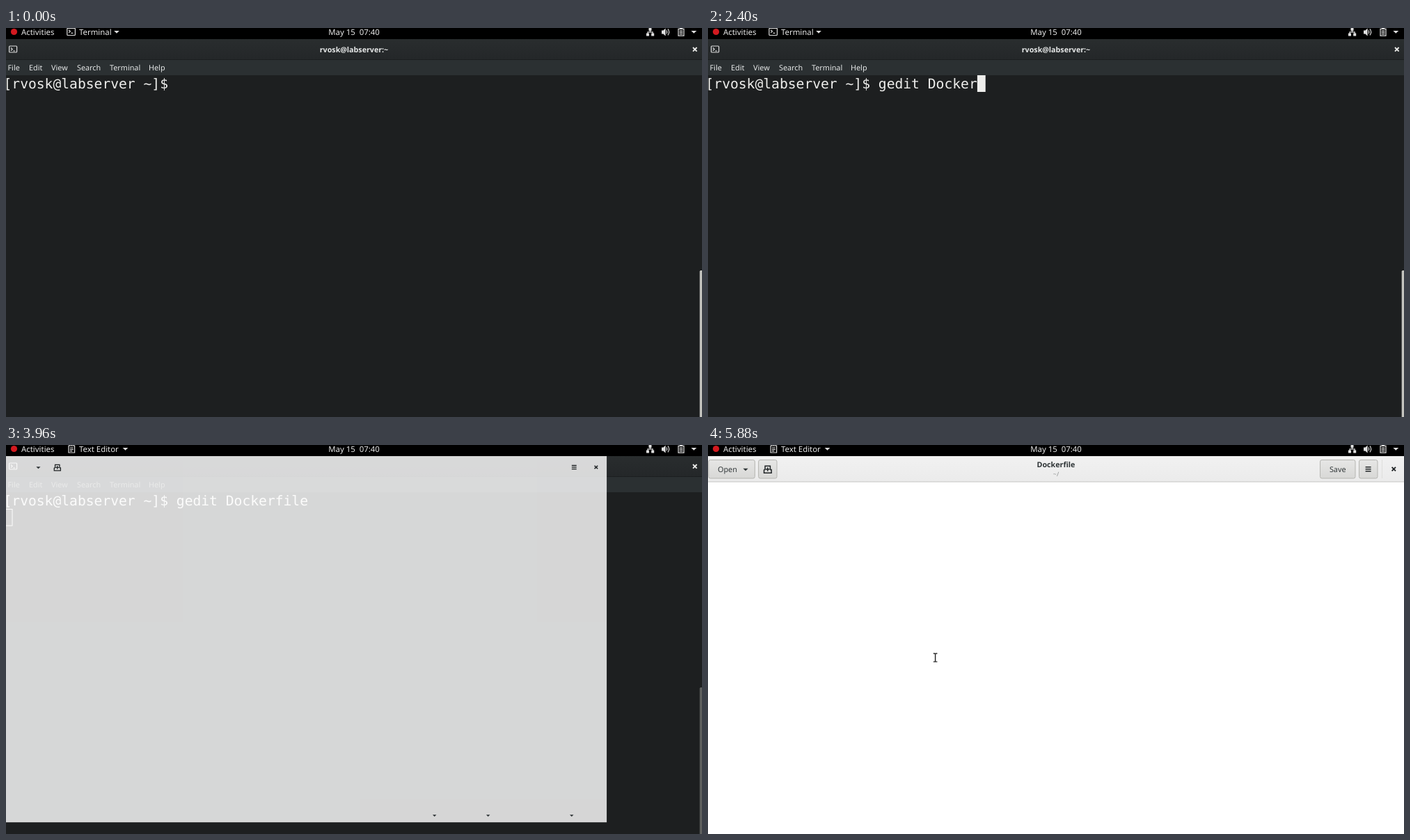
An HTML page for the animation above (6 s loop, 1000x560 px).

```html
<!DOCTYPE html>
<html lang="en">
<head>
<meta charset="utf-8">
<title>Terminal</title>
<style>
  html, body { margin: 0; width: 100%; height: 100%; overflow: hidden; background: #000; }
  svg { display: block; width: 1000px; height: 560px; }
  text { font-family: "Noto Sans", "Open Sans", sans-serif; white-space: pre; text-rendering: geometricPrecision; }
  .bar { font-size: 11.4px; font-weight: 500; fill: #e8e8e8; }
  .menu { font-size: 10.8px; fill: #e6e8e8; }
  .bold { font-size: 10.7px; font-weight: 700; }
  .mono { font-family: "DejaVu Sans Mono", monospace; font-size: 19.65px; fill: #eeeeec; }
  .btn { font-size: 10.8px; fill: #33393b; }
  .line { fill: none; stroke-width: 1.2; }
</style>
</head>
<body>
<svg id="stage" viewBox="0 0 1000 560" xmlns="http://www.w3.org/2000/svg"></svg>
<script>
const LOOP = 6000;
const CELL = 11.83, LEFT = -3.5, ROW = 68, ROW_H = 24;
const PROMPT = "[rvosk@labserver ~]$ ";
const COMMAND = "gedit Dockerfile";
const KEYS = [600, 960, 1080, 1260, 1380, 1560, 1860, 1980, 2100, 2160, 2280, 2400, 2580, 2700, 2820, 2940];
const CURSOR_ON = 60, ENTER = 3360, LAUNCH = 3660, BLUR = 3720, POINTER = 5400;
// start time, x scale, y scale, opacity
const OPENING = [
  [3900, .053, .084, .03],
  [3960, .8605, .86, .82],
  [4020, .9985, .9985, .987],
  [4080, 1, 1, 1]
];

const label = (x, y, s, cls, extra = "") => `<text x="${x}" y="${y}" class="${cls}" ${extra}>${s}</text>`;
const mid = 'text-anchor="middle"';
const arrow = (x, y, w, color) => `<path d="M${x - w} ${y - w / 2}h${2 * w}l${-w} ${w}z" fill="${color}"/>`;
const cross = (x, y, r, color) =>
  `<path d="M${x - r} ${y - r}l${2 * r} ${2 * r}M${x + r} ${y - r}l${-2 * r} ${2 * r}" stroke="${color}" stroke-width="1.8"/>`;
const button = (x, w) =>
  `<rect x="${x}" y="21.5" width="${w}" height="26.5" rx="2.5" fill="url(#face)" stroke="#b5b5b1"/>`;
const prompt = (x, y, w, h) =>
  `<g class="line" stroke="#dedede"><rect x="${x}" y="${y}" width="${w}" height="${h}" rx="1"/>
   <path d="M${x + 2.4} ${y + 2.5}l2.2 2-2.2 2M${x + 5.6} ${y + 7}h3"/></g>`;

const menus = [["File", 2.5], ["Edit", 33], ["View", 65], ["Search", 102], ["Terminal", 149], ["Help", 205]];

const terminal = `
  <rect y="16" width="1000" height="544" fill="#1d1f20"/>
  <rect y="16" width="1000" height="30" fill="url(#title)"/>
  <rect y="45" width="1000" height="1" fill="#1b1e1f"/>
  <rect y="46" width="1000" height="22" fill="#2b3032"/>
  ${prompt(4.6, 26, 11, 9)}
  ${cross(989.8, 30.8, 2.8, "#eeeeec")}
  ${label(500, 34.5, PROMPT.slice(1, 16) + ":~", "bold", mid + ' fill="#e6e8e8" id="caption"')}
  <g id="menus">${menus.map(([s, x]) => label(x, 60.7, s, "menu")).join("")}</g>
  <rect id="thumb" x="996.7" y="349" width="5" height="215" rx="1.5"/>
  <text id="typed" class="mono" x="${LEFT}" y="87"></text>
  <rect id="cursor" stroke="#eeeeec"/>`;

const panel = `
  <rect width="1000" height="16" fill="#000"/>
  <circle cx="11.5" cy="5.5" r="4.6" fill="#d3191f"/>
  ${label(22, 9.6, "Activities", "bar")}
  <g id="appTerm">${prompt(87.8, .3, 11.6, 10.2)}
    ${label(105, 9.6, "Terminal", "bar")}${arrow(159, 5.9, 3.8, "#dedede")}</g>
  <g id="appEdit"><g class="line" stroke="#dedede">
      <path d="M90 1h8.6v10h-8.6zM91.8 4h5M91.8 6.3h5M91.8 8.6h3.4M91.6 -.5v2M94.3 -.5v2M97 -.5v2"/></g>
    ${label(105, 9.6, "Text Editor", "bar")}${arrow(171.5, 5.9, 3.8, "#dedede")}</g>
  ${label(500, 9.6, "May 15\u00a0 07:40", "bar", mid)}
  <g fill="#e0e0e0">
    <path d="M923.5 0h4v4h-4zM920 7.5h4v4h-4zM927.2 7.5h4v4h-4z"/>
    <path d="M942 3.5h2.4l3.2-3v11l-3.2-3h-2.4z"/>
  </g>
  <g class="line" stroke="#e0e0e0">
    <path d="M925.5 4v2M922 8v-2.2h7.2v2.2"/>
    <path d="M949 3.4q1.6 2.4 0 4.8M951 1.4q3.4 4.5 0 9"/>
    <path d="M966 1.4h8v9.8h-8zM968 .2h4M967.6 4.2h4.8M967.6 6.4h4.8M967.6 8.6h4.8"/>
  </g>
  ${arrow(988.3, 5.9, 3.9, "#e0e0e0")}`;

const editor = `
  <rect y="16" width="1003" height="613" fill="#fff"/>
  <g id="header">
    <rect y="16" width="1003" height="37" fill="url(#head)"/>
    <rect y="52.5" width="1003" height="1" fill="#c6c6c3"/>
    ${button(.8, 66.5)}${button(72.6, 26.4)}${button(879.5, 50.5)}${button(935.5, 26.5)}
    <rect x="968" y="21" width="1" height="27" fill="#dededc"/>
    ${label(14, 38.6, "Open", "btn")}
    ${label(904.7, 38.6, "Save", "btn", mid)}
    ${label(500, 32.2, "Dockerfile", "bold", mid + ' fill="#2e3436"')}
    ${label(500, 45.2, "~/", "btn", mid + ' style="font-size:8.8px;fill:#8b8e8f"')}
  </g>
  ${arrow(54, 35.5, 3.6, "#2e3436")}
  <path d="M82 35.5v-5.2h7.4v5.2M80.5 35.5v4.7h10.6v-4.7h-2M80.5 35.5h2M85.7 32.2v5.6M83 35h5.4" class="line" stroke="#1f2325" style="stroke-width:1.5"/>
  <path d="M944.6 31.7h8M944.6 34.7h8M944.6 37.7h8" stroke="#1f2325" stroke-width="1.5"/>
  ${cross(985.3, 34.6, 2.7, "#1f2325")}
  ${[715.5, 805, 944.5].map(x => arrow(x, 618, 3.2, "#2e3436")).join("")}`;

const ibeam = "M323.8 300.2h2l.8.7.8-.7h2M326.6 300.9v10.4M323.8 312h2l.8-.7.8.7h2";

const shade = (id, a, b) =>
  `<linearGradient id="${id}" x2="0" y2="1"><stop stop-color="${a}"/><stop offset="1" stop-color="${b}"/></linearGradient>`;

document.getElementById("stage").innerHTML = `
  <defs>${shade("title", "#292d2e", "#242729")}${shade("head", "#f1f1f1", "#ebebeb")}${shade("face", "#e6e6e5", "#d8d8d6")}</defs>
  ${terminal}
  <g id="editor">${editor}</g>
  ${panel}
  <g id="pointer" fill="none"><path d="${ibeam}" stroke="#ddd" stroke-width="2.6"/><path d="${ibeam}" stroke="#222" stroke-width="1.2"/></g>`;

const el = {};
for (const node of document.querySelectorAll("[id]")) el[node.id] = node;
const set = (id, attrs) => { for (const k in attrs) el[id].setAttribute(k, attrs[k]); };
const show = (id, on) => set(id, { visibility: on ? "visible" : "hidden" });

function render(t) {
  const count = KEYS.filter(k => t >= k).length;
  el.typed.textContent = PROMPT + COMMAND.slice(0, count);

  const entered = t >= ENTER, blurred = t >= BLUR;
  const col = entered ? 0 : PROMPT.length + count;
  const inset = blurred ? .5 : 0;
  set("cursor", {
    x: LEFT + col * CELL + inset, y: ROW + entered * ROW_H + inset,
    width: CELL + (blurred ? .2 : 0), height: ROW_H - inset * 2 + (blurred ? .6 : 0),
    fill: blurred ? "none" : "#eeeeec", "stroke-width": blurred ? 1 : 0
  });
  show("cursor", t >= CURSOR_ON);

  const fade = Math.min(1, Math.max(0, (t - BLUR) / 180));
  const dim = 1 - .5 * fade;
  set("caption", { opacity: t >= OPENING[1][0] ? 0 : dim });
  set("menus", { opacity: dim });
  set("thumb", { fill: "#c4c4bf", opacity: 1 - .6 * fade });

  show("appTerm", t < LAUNCH);
  show("appEdit", t >= LAUNCH);

  const step = OPENING.filter(s => t >= s[0]).pop();
  show("editor", step);
  show("header", step && t >= OPENING[2][0]);
  if (step) {
    const [, sx, sy, opacity] = step;
    set("editor", { transform: `translate(0 16) scale(${sx} ${sy}) translate(0 -16)`, opacity });
  }
  show("pointer", t >= POINTER);
}

const start = performance.now();
function tick() {
  render((performance.now() - start) % LOOP);
  requestAnimationFrame(tick);
}
tick();
</script>
</body>
</html>
```
